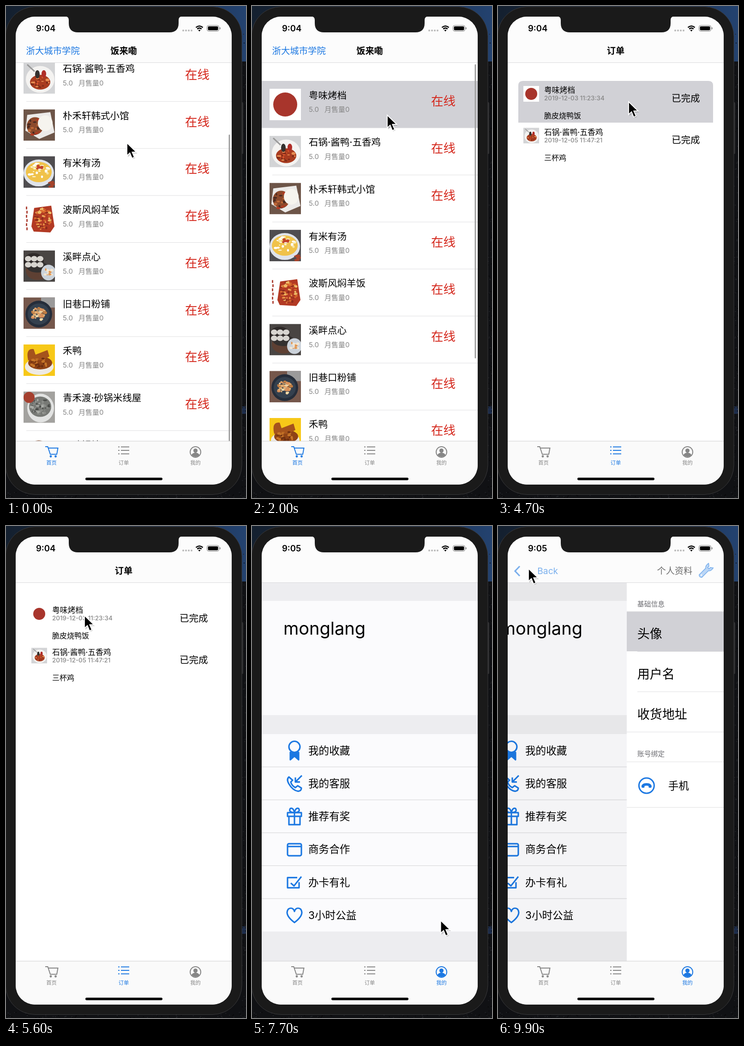
These frames come from a looping animation (520 px wide and 1064 px high, 10000 ms). An HTML page:

```html
<!DOCTYPE html>
<html lang="zh-CN">
<head>
<meta charset="utf-8">
<style>
html, body { margin: 0; width: 520px; height: 1064px; overflow: hidden; background: #0c0d10; }
svg { display: block; font-family: Inter, 'Noto Sans CJK SC', 'Noto Sans CJK', 'Noto Sans', sans-serif; }
text { white-space: pre; }
</style>
</head>
<body>
<svg id="stage" width="520" height="1064" viewBox="0 0 520 1064"></svg>
<script>
const BLUE = '#1c78e2', GREY = '#868686', PICK = '#d1d1d6';
const W = 468, LEFT = 21, TOP = 122, BOTTOM = 941, PITCH = 101.7;

let seed = 7;
const rnd = () => (seed = (seed * 16807) % 2147483647) / 2147483647;

// y is the vertical centre of the glyphs
const text = (x, y, s, size, fill = '#000', weight = 400, anchor = 'start', id = '') =>
  `<text ${id && `id="${id}"`} x="${x}" y="${(y + size * .37).toFixed(2)}" font-size="${size}" fill="${fill}" font-weight="${weight}" text-anchor="${anchor}">${s}</text>`;
const rect = (x, y, w, h, fill, more = '') =>
  `<rect x="${x}" y="${y}" width="${w}" height="${h}" fill="${fill}" ${more}/>`;
const oval = (x, y, rx, ry, fill) => `<ellipse cx="${x}" cy="${y}" rx="${rx}" ry="${ry}" fill="${fill}"/>`;
const line = (x, y, c = '#dfdfe1') => rect(x, y - .5, 489 - x, 1, c);
const group = (id, body, more = '') => `<g id="${id}" ${more}>${body}</g>`;
const list = (n, f) => Array.from({ length: n }, (_, i) => f(i)).join('');

// ---- dish pictures, 68 x 68
const bits = (x, y, rx, ry, n, colours) => list(n, () => {
  const a = rnd() * 6.283, r = Math.sqrt(rnd());
  return oval((x + rx * r * Math.cos(a)).toFixed(1), (y + ry * r * Math.sin(a)).toFixed(1),
    (1.5 + rnd() * 3).toFixed(1), (1 + rnd() * 2).toFixed(1), colours[Math.floor(rnd() * colours.length)]);
});
const dishes = [
  rect(0, 0, 68, 68, '#fff') + oval(34, 34, 26, 26, '#a8352c'),
  rect(0, 0, 68, 68, '#d3d4d6') + oval(36, 37, 31, 29, '#f4f3f1') + oval(36, 43, 22, 16, '#a93c20') +
    bits(36, 44, 19, 13, 24, ['#d9552c', '#7d2a18', '#e88e52']) + oval(30, 26, 5, 9, '#34302e') + oval(44, 25, 5, 8, '#b02e28') +
    '<path d="M8 5l16 15" stroke="#999" stroke-width="3"/>',
  rect(0, 0, 68, 68, '#6d5548') + '<path d="M8 12L58 6 67 50 34 64 4 46Z" fill="#eceae8"/>' +
    oval(25, 36, 18, 19, '#8c4a2c') + bits(25, 38, 16, 18, 26, ['#4a2a20', '#c06a38', '#b33a22']) + oval(47, 30, 16, 17, '#f6f4ee'),
  rect(0, 0, 68, 68, '#4f4d50') + oval(33, 36, 33, 29, '#dfe3ea') + oval(33, 34, 28, 22, '#f0c24a') +
    bits(33, 32, 24, 17, 30, ['#fbf6e0', '#f6e3a0', '#ffffff']) + bits(33, 24, 8, 5, 6, ['#c4442a']) + bits(58, 60, 8, 6, 8, ['#a8432a']),
  rect(0, 0, 68, 68, '#fff') + '<path d="M23 10L60 5 67 50 58 63 22 61 17 50Z" fill="#b23a24"/>' +
    bits(42, 34, 20, 23, 60, ['#d8682c', '#e99546', '#8d2c1c', '#efbc68']) +
    list(6, i => rect(5 + i % 2, 7 + i * 9, 3, 6, '#b0483c')),
  rect(0, 0, 68, 68, '#494543') + oval(22, 24, 22, 18, '#2f2a29') + oval(30, 44, 25, 20, '#5e4033') + oval(30, 36, 23, 12, '#33302f') +
    list(6, i => oval(10 + i % 3 * 13, 18 + (i > 2) * 13, 7, 6, '#d8d5d0')) + oval(54, 48, 16, 17, '#cbd2da') + bits(54, 47, 10, 10, 14, ['#e2934a', '#f1e6d4']),
  rect(0, 0, 68, 68, '#75574b') + rect(38, 0, 30, 22, '#9b9a9a') + oval(33, 36, 29, 29, '#252d3a') + oval(33, 36, 24, 23, '#34404e') +
    bits(33, 36, 15, 15, 55, ['#e2b378', '#f0d8a8', '#bf7c42', '#d9905a']),
  rect(0, 0, 68, 68, '#f7c818') + oval(34, 48, 31, 18, '#eeeae4') + oval(36, 40, 26, 14, '#8f4316') +
    '<path d="M10 34Q4 8 22 10L26 22 52 12 56 26 40 34Z" fill="#a5531c"/>' + bits(35, 40, 20, 10, 24, ['#c67528', '#6d2f10']),
  rect(0, 0, 68, 68, '#a3a29f') + oval(37, 36, 29, 31, '#e2e3e2') + oval(36, 33, 24, 22, '#777975') +
    bits(36, 33, 20, 18, 45, ['#a9aba6', '#4b4d4a', '#8b8d89']) + oval(12, 13, 12, 12, '#a5402f'),
  rect(0, 0, 68, 68, '#fff') + oval(33, 34, 24, 30, '#9a6a50')
];

// ---- home list
const shops = ['粤味烤档', '石锅·酱鸭·五香鸡', '朴禾轩韩式小馆', '有米有汤', '波斯风焖羊饭',
  '溪畔点心', '旧巷口粉铺', '禾鸭', '青禾渡·砂锅米线屋', '四味锅坊'];
const APP = '饭来嘞', PHONE = '12042017003';

const home = rect(LEFT, TOP, W, 1200, '#fff') + group('roll',
  rect(LEFT, 162, W, PITCH, PICK, 'id="pickShop"') + shops.map((s, i) => {
    const y = 162 + i * PITCH;
    return `<use href="#dish${i}" transform="translate(38 ${y + 17})"/>` +
      text(123, y + 31, s, 20.5, '#000', 500) + text(123, y + 61.5, '5.0', 15, GREY) + text(157, y + 61.5, '月售量0', 15, GREY) +
      text(388, y + 43.5, '在线', 26.5, '#d4271c', 500) + line(44, y + PITCH);
  }).join('')) + rect(482.5, 126, 3, 636, '#a0a0a0', 'id="thumb" rx="1.5"');

// ---- shop page
const facts = [['店铺名称', shops[0]], ['店铺电话', PHONE], ['店铺地址', '松汀休闲中心'],
  ['店铺评分', '5.0'], ['店铺状态', '在线'], ['店铺公告', '请注意!!']];
const shop = rect(LEFT, TOP, W, 820, '#fff') + list(16, i => line(44, 171.5 + i * 49.75)) +
  rect(LEFT, 167, 234, 1.5, '#c4c4c4') + rect(255, 165.5, 234, 2.5, '#f0961e') +
  text(137.5, 145.5, '点菜', 19.5, GREY, 400, 'middle') + text(372, 145, '商家', 21.5, '#f0961e', 400, 'middle') +
  facts.map(([k, v], i) => text(44, 208.5 + i * 56.5, k, 27, '#000', 500) + text(214, 208.5 + i * 56.5, v, 27, '#85857f', 500)).join('');

// ---- orders and order detail
const orderRow = (i, name, when, item) => {
  const y = 162 + i * 90.3;
  const edge = i ? 'v80.3q0 10-10 10h-402q-10 0-10-10v-80.3z' : 'v80.3h-422v-80.3q0-10 10-10h402q10 0 10 10z';
  return `<path id="pickOrder${i}" d="M${i ? 44 : 466} ${i ? y : y + 10}${i ? 'h422' : ''}${edge}" fill="${PICK}"/>` +
    `<use href="#dish${i}" transform="translate(55 ${y + 11}) scale(.5)"/>` +
    text(100, y + 20, name, 16.8, '#000', 500) + text(100, y + 37.5, when, 13.4, GREY, 500) +
    text(376, y + 37, '已完成', 20.5, '#000', 500) + text(100, y + 75.5, item, 16, '#000', 500);
};
const orders = rect(LEFT, TOP, W, 820, '#fff') +
  orderRow(0, shops[0], '2019-12-03 11:23:34', '脆皮烧鸭饭') + orderRow(1, shops[1], '2019-12-05 11:47:21', '三杯鸡');

const detail = rect(LEFT, TOP, W, 820, '#eef4d3') + rect(LEFT, TOP, W, 75, '#f9c614') + rect(LEFT, 387, W, 74, '#f8bc62') +
  text(53, 160, '订单详情', 28, '#1d1b2c') + text(53, 424, '订单信息', 28, '#1d1b2c') +
  '<path d="M103 231l6-7 6 5 6-5 6 7M105 232h20l-2 16h-16zM110 238h10" fill="none" stroke="#ef8a24" stroke-width="2.2"/>' +
  text(45, 303, '三杯鸡', 22.5, '#85857f', 400, 'start', 'item') +
  ['订单号', '订单时间', '支付方式'].map((s, i) => text(45, [511, 591, 679][i], s, 27, '#62625e')).join('');

// ---- account and profile
const menu = ['我的收藏', '我的客服', '推荐有奖', '商务合作', '办卡有礼', '3小时公益'];
const marks = [
  '<circle r="12" cy="-8"/><path d="M-9 4V20L0 12 9 20V4Q0 9-9 4Z" fill="currentColor"/>',
  '<path d="M-12-14q-6 5 0 15 8 14 20 16 7-1 7-7l-8-5-5 4q-8-4-10-12l4-4zM16-17L2-3M2-13V-3H12"/>',
  '<path d="M-15-8H15V0H-15ZM-12 0V18H12V0M0-8V18M0-8Q-14-9-9-17-3-20 0-8 3-20 9-17 14-9 0-8"/>',
  '<rect x="-15" y="-12" width="30" height="26" rx="3"/><path d="M-15-6H15"/>',
  '<path d="M6-10H-15V12H10V0M-8 2L-1 8 15-12"/>',
  '<path d="M0 16Q-16 4-16-6-15-15-8-15-2-15 0-8 2-15 8-15 15-15 16-6 16 4 0 16Z"/>'
];
const mine = rect(LEFT, TOP, 610, 820, '#ededf0') + rect(LEFT, 162, 610, 247, '#fbfbfd') + rect(LEFT, 450, 610, 427, '#fbfbfd') +
  text(246, 221, 'monglang', 38, '#000', 400, 'end') +
  menu.map((s, i) => {
    const y = 485.5 + i * 71.2;
    return `<g transform="translate(92 ${y})" color="${BLUE}" fill="none" stroke="${BLUE}" stroke-width="3.2" stroke-linejoin="round">${marks[i]}</g>` +
      text(122, y, s, 22.6) + (i < 5 ? line(LEFT, y + 35.5, '#d2d2d5') : '');
  }).join('');

const profile = rect(LEFT, TOP, W, 820, '#fff') + rect(LEFT, 185, W, 86, PICK, 'id="pickFace"') +
  text(44, 168.5, '基础信息', 14.8, '#6d6d72') + text(44, 492.5, '账号绑定', 14.8, '#6d6d72') +
  ['头像', '用户名', '收货地址'].map((s, i) => text(44, 233.5 + i * 87, s, 27)).join('') +
  line(LEFT, 185) + line(44, 271.5) + line(44, 358.5) + line(LEFT, 445.5) + line(LEFT, 510) + line(LEFT, 608.5) +
  `<circle cx="64" cy="561.5" r="16.5" fill="none" stroke="${BLUE}" stroke-width="3"/>` +
  `<path d="M53 564q0-8 11-8t11 8l-1 2h-5l-1-4q-4-1-8 0l-1 4h-5z" fill="${BLUE}"/>` +
  text(111, 561.5, '手机', 22.5) + text(304, 558.5, PHONE, 18.5, GREY);

// ---- bars
const navText = (id, s, weight = 500) => text(255, 97, s, 19.2, '#000', weight, 'middle', id);
const wrench = `<g id="wrench"><g transform="translate(450 97) rotate(45)">
  <path d="M-4 16V-4Q-9-8-7-16L-2-12V-8H2V-12L7-16Q9-8 4-4V16Q0 20-4 16Z" fill="#8ebcf3" stroke="${BLUE}" stroke-width="1.6"/>
  <circle cy="13" r="1.5" fill="#fff"/></g></g>`;
const nav = rect(LEFT, 23, W, 99, '#fcfcfc') + line(LEFT, 122.5, '#d9d9db') +
  text(43.5, 97, '浙大城市学院', 19.4, BLUE, 400, 'start', 'school') + navText('base', '', 600) + navText('front', '') + wrench +
  text(55, 97, '', 19.2, BLUE, 400, 'start', 'back') +
  `<path id="chevron" d="M47 87L37 97.5 47 108" fill="none" stroke="${BLUE}" stroke-width="3.2"/>`;

const tabArt = [
  '<path d="M85 953h5.5l5.5 16.5h14l2.5-13.5H92"/><circle cx="97" cy="974" r="1.4"/><circle cx="107.5" cy="974" r="1.4"/>',
  list(3, i => `<path d="M249 ${953.5 + i * 7.5}h18M243 ${953.5 + i * 7.5}h3"/>`),
  '<circle cx="410.5" cy="964.5" r="11.5"/><circle cx="410.5" cy="961.5" r="3.6" fill="currentColor"/><path d="M403 971q2-4 7.500-4t7.500 4q-7 6-15 0z" fill="currentColor"/>'
];
const tabs = rect(LEFT, BOTTOM, W, 95, '#fafafa') + line(LEFT, BOTTOM, '#cfcfd1') + ['首页', '订单', '我的'].map((s, i) =>
  group('tab' + i, `<g fill="none" stroke="currentColor" stroke-width="2">${tabArt[i]}</g>` +
    text([98.5, 255, 410.5][i], 988, s, 11.3, 'currentColor', 500, 'middle'))).join('') +
  rect(172, 1020, 167, 5.5, '#000', 'rx="2.7"');

const status = text(65, 48.5, '9:04', 18.5, '#000', 600, 'start', 'clock') +
  list(4, i => oval(384 + i * 6, 53, 2, 2, '#b9b9b9')) +
  '<path d="M411.500 46.500q7.500-6.500 15 0M414.300 49.700q4.700-4 9.400 0" fill="none" stroke="#000" stroke-width="2.600"/><path d="M416.500 52.200q2.500-2 5 0l-2.500 3z"/>' +
  '<rect x="435.500" y="42" width="26" height="12.500" rx="3.800" fill="none" stroke="#777"/>' + rect(437.5, 44, 22, 8.5, '#000', 'rx="2"') + rect(463, 46, 1.6, 4.5, '#777', 'rx=".8"');

const backdrop = rect(0, 0, 520, 1064, '#101114') + rect(0, 0, 520, 120, 'url(#sky)') + rect(505, 866, 15, 16, '#1c2d4d') +
  list(260, i => {
    const side = i % 2, x = side ? 510 + rnd() * 10 : rnd() * 520, y = side ? 60 + rnd() * 1000 : 1050 + rnd() * 14;
    return rect(x.toFixed(1), y.toFixed(1), 2, 1.5, rnd() < .5 ? '#25272b' : '#060607');
  });

const page = (id, body) => group(id, body, 'clip-path="url(#pane)"');
const stage = document.getElementById('stage');
stage.innerHTML = `<defs>
  <linearGradient id="sky"><stop offset="0" stop-color="#14202f"/><stop offset=".5" stop-color="#1b2c47"/><stop offset="1" stop-color="#23426f"/></linearGradient>
  <clipPath id="glass"><rect x="21" y="23" width="468" height="1012" rx="42"/></clipPath>
  <clipPath id="view"><rect x="21" y="122" width="468" height="819"/></clipPath>
  <clipPath id="pane"><rect x="21" y="122" width="610" height="819"/></clipPath>
  <clipPath id="tile"><rect width="68" height="68"/></clipPath>
  ${dishes.map((d, i) => group('dish' + i, d, 'clip-path="url(#tile)"')).join('')}</defs>` +
  backdrop + rect(508, 208, 6, 112, '#303032', 'rx="2"') +
  rect(-1, 1.5, 512, 1055, '#1a1a1a', 'rx="64" stroke="#3a3a3c"') +
  `<g clip-path="url(#glass)">${rect(LEFT, 23, W, 1012, '#fff')}<g clip-path="url(#view)">` +
  page('home', home) + page('orders', orders) + page('mine', mine) + rect(LEFT, TOP, W, 820, '#000', 'id="dim"') +
  page('shop', shop) + page('detail', detail) + page('profile', profile) + `</g>${nav}${tabs}${status}</g>` +
  '<path d="M128 22.500q8 0 8 8v6.500q0 20 20 20h198q20 0 20-20v-6.500q0-8 8-8z" fill="#1a1a1a"/>' +
  group('cursor', '<path d="M2 3v28l6.500-6 4.500 10 5-2-4.500-10h9z" fill="#000" opacity=".18"/><path d="M0 0V27.500L6.300 21.700 11 33 16 31 11.300 20H20.500Z" stroke="#fff" stroke-width="1.800"/>');

// ---- time
const el = id => document.getElementById(id);
const show = (id, on) => el(id).setAttribute('opacity', +on);
const move = (id, x, y = 0) => el(id).setAttribute('transform', `translate(${x} ${y})`);
const say = (id, s) => { el(id).textContent = s; };
const smooth = u => u * u * (3 - 2 * u), straight = u => u;

// keys: [time, value, value...]
function at(keys, t, ease = straight) {
  const n = keys.findIndex(k => k[0] > t);
  if (n < 0) return keys[keys.length - 1].slice(1);
  if (!n) return keys[0].slice(1);
  const a = keys[n - 1], b = keys[n], u = ease((t - a[0]) / (b[0] - a[0]));
  return a.slice(1).map((v, i) => v + (b[i + 1] - v) * u);
}

const pointer = [[0, 262, 296], [1400, 262, 296], [1900, 293, 236], [2300, 293, 236], [2700, 372, 148], [3100, 372, 148],
  [3400, 110, 172], [3600, 45, 97], [3900, 45, 97], [4300, 255, 968], [4600, 283, 207], [4900, 283, 207], [5200, 50, 97],
  [5500, 50, 97], [5700, 290, 290], [5900, 290, 290], [6100, 76, 95], [6500, 76, 95], [6900, 410, 968], [7500, 410, 968],
  [8300, 402, 232], [9300, 402, 232], [9700, 66, 92]];
const scroll = [[0, 159], [1600, 0]];
const pushes = {
  home: [[2000, 0], [2100, .3], [2200, .7], [2300, .92], [2400, 1], [3600, 1], [3700, .6], [3800, .2], [3900, 0]],
  orders: [[4700, 0], [4800, .5], [4900, .88], [5000, 1], [5200, 1], [5300, .6], [5400, .2], [5500, 0],
    [5700, 0], [5800, .5], [5900, .88], [6000, 1], [6200, 1], [6300, .6], [6400, .192], [6500, .05], [6600, 0]],
  mine: [[8700, 0], [8800, .3], [8900, .645], [9000, .87], [9100, .97], [9200, 1], [9700, 1], [9800, .76], [9900, .449]]
};
const fronts = { home: 'shop', orders: 'detail', mine: 'profile' };
const titles = { home: [APP, shops[0], APP], orders: ['订单', '订单详情', '订单'], mine: ['', '个人资料', 'Back'] };

function draw(t) {
  const tab = t < 4300 ? 0 : t < 6900 ? 1 : 2;
  const root = Object.keys(fronts)[tab];
  const [p] = at(pushes[root], t), q = 1 - p, fade = p ** .7;

  for (const k in fronts) {
    show(k, k === root);
    show(fronts[k], k === root && p > 0);
  }
  move(root, -.3 * W * p);
  move(fronts[root], W * q);
  show('dim', p * .06);
  el('dim').setAttribute('width', W * q);

  const [base, front, back] = titles[root];
  const rest = 55 + base.length * 9.6, drift = (rest - 255) * p ** .9;
  say('base', base);
  say('front', front);
  say('back', back);
  move('base', drift);
  move('back', base ? 255 - rest + drift : 55 * q);
  move('front', (tab < 2 ? 250 : t < 9300 ? 296 : 232) * q);
  show('base', q);
  show('back', base ? p : fade);
  show('front', fade);
  show('chevron', fade);
  show('school', tab ? 0 : q);
  show('wrench', tab === 2 ? fade : 0);

  const [s] = at(scroll, t, smooth);
  move('roll', 0, -s);
  el('thumb').setAttribute('y', 126 + s * .956);
  el('thumb').setAttribute('height', 636 + s * .18);
  show('thumb', t < 2500);
  show('pickShop', t >= 1900 && t < 3900);
  show('pickOrder0', t >= 4600 && t < 5500);
  show('pickOrder1', t >= 5700 && t < 6600);
  show('pickFace', t >= 9300);
  say('item', t < 5600 ? '脆皮烧鸭饭' : '三杯鸡');

  for (let i = 0; i < 3; i++) el('tab' + i).setAttribute('color', i === tab ? BLUE : GREY);
  say('clock', t < 7500 ? '9:04' : '9:05');
  move('cursor', ...at(pointer, t, smooth));
}

const start = performance.now();
function tick() {
  draw(Math.floor((performance.now() - start + 1) / 100) * 100 % 10000);
  requestAnimationFrame(tick);
}
tick();
</script>
</body>
</html>
```
